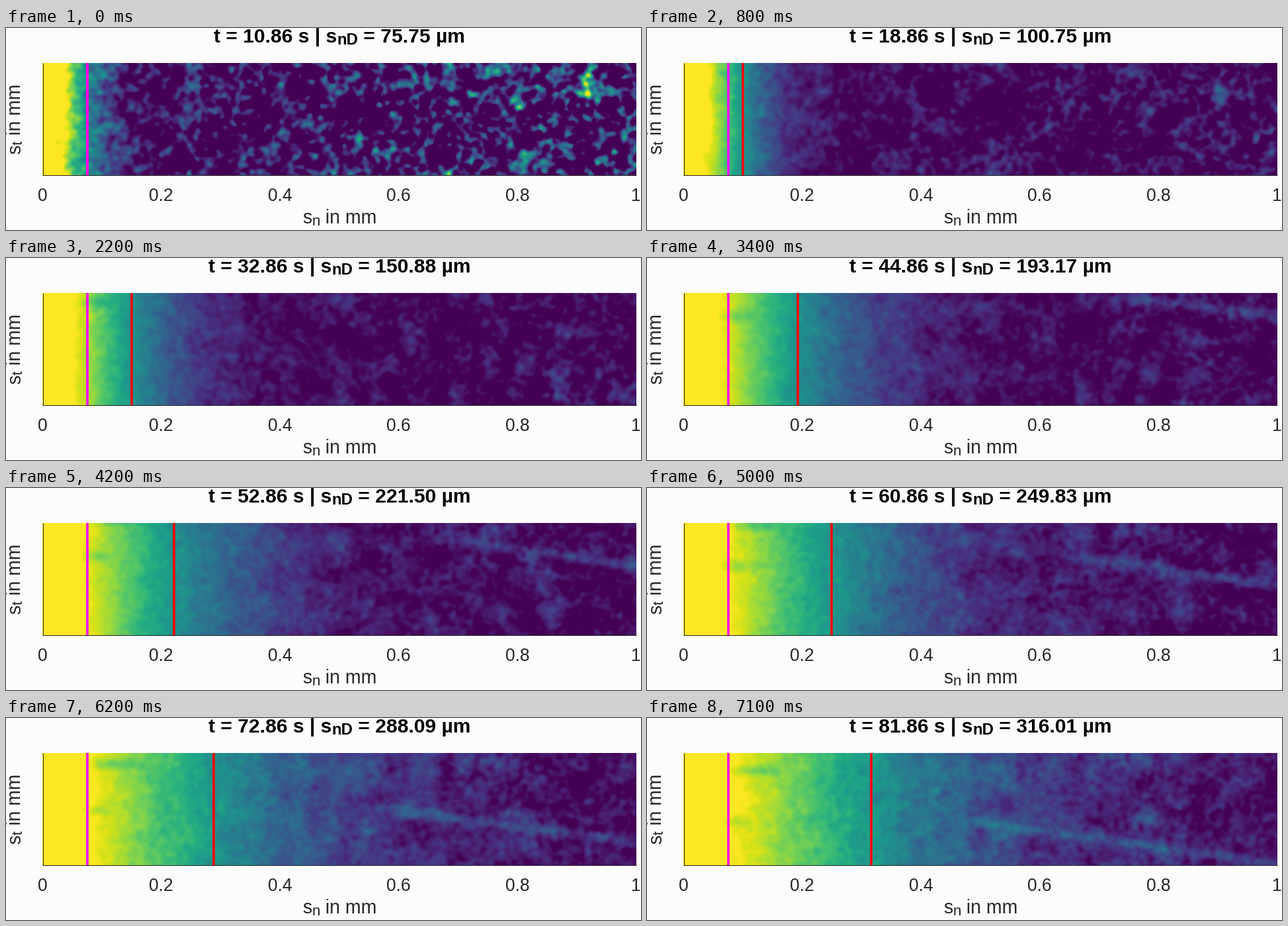
Recreate the animation shown at these times as a matplotlib script. Size 960 by 306 pixels, loop 7.2 s.

```python
import math

import numpy as np
import matplotlib.pyplot as plt
from matplotlib.animation import FuncAnimation

W, H, DPI = 960, 306, 100
FRAMES, INTERVAL = 72, 100
LEFT, RIGHT, TOP, BOTTOM = 55, 952.5, 53, 223
NX, NY, CELL = 450, 85, 2

plt.rcParams["font.family"] = "Liberation Sans"
rng = np.random.default_rng(12)

# Measured diffusion depth in micrometres at a few frames
DEPTH_AT = [0, 8, 22, 34, 50, 62, 71]
DEPTH = [75.75, 100.75, 150.88, 193.17, 249.83, 288.09, 316.01]

# Pixel coordinates of the field samples, and distance in mm
X, Y = np.meshgrid(LEFT + CELL * (np.arange(NX) + .5),
                   TOP + CELL * (np.arange(NY) + .5))
MM = (X - LEFT) / (RIGHT - LEFT)
FX = np.fft.fftfreq(NX)[None, :]
FY = np.fft.fftfreq(NY)[:, None]

Z = np.linspace(0, 4, 400)
ERFC = np.array([math.erfc(z) for z in Z])


def to_px(mm):
    return LEFT + mm * (RIGHT - LEFT)


def spectrum(sigma):
    """Spectrum of smooth noise with unit variance."""
    f = np.fft.fft2(rng.standard_normal((NY, NX)))
    f *= np.exp(-2 * (np.pi * sigma) ** 2 * (FX ** 2 + FY ** 2))
    f[0, 0] = 0
    return f / np.fft.ifft2(f).real.std()


STEP = 14
KEYS = FRAMES // STEP + 2
fine = [spectrum(1.6) for _ in range(KEYS)]
coarse = [spectrum(5) for _ in range(KEYS)]


def noise(keys, i):
    """Noise that drifts left and down while it slowly changes."""
    k, part = divmod(i, STEP)
    a = part / STEP * np.pi / 2
    f = np.cos(a) * keys[k] + np.sin(a) * keys[k + 1]
    phase = np.exp(-2j * np.pi * (FX * -.9 * i + FY * .44 * i))
    return np.fft.ifft2(f * phase).real


def blob(x, y, sx, sy, amp):
    return amp * np.exp(-((X - x) / sx) ** 2 / 2 - ((Y - y) / sy) ** 2 / 2)


def front(x, depth, source):
    """Diffusion profile that falls to one half at the given depth."""
    k = np.interp(.5 / source, ERFC[::-1], Z[::-1])
    return source * np.interp(k * x / depth, Z, ERFC)


def streak(i):
    """Faint slanted trail that sinks and grows towards the left."""
    line = 220 - 3.55 * (FRAMES - 1 - i) + .137 * (X - 950)
    fade = 1 / (1 + np.exp((950 - 6.4 * i - X) / 20))
    return .15 * fade * np.exp(-((Y - line) / 6) ** 2 / 2)


def fingers(i):
    """Two darker notches that sink along the edge of the front."""
    left = FRAMES - 1 - i
    return (blob(158, 80 - 1.1 * left, 24, 6, -.13)
            + blob(135, 157 - 1.85 * left, 16, 6, -.11))


def clouds(i):
    """Bright patches, strong at first, and one drifting particle."""
    fade = .3 + .7 * np.exp(-i / 4)
    patches = (blob(518, 82, 28, 13, .2) + blob(740, 64, 24, 10, .4)
               + blob(520, 125, 38, 13, -.2))
    return fade * (patches + blob(894 - 1.8 * i, 91 + .9 * i, 18, 8, .45))


def field(i, depth):
    small, large = noise(fine, i), noise(coarse, i)
    amp = max(.25 / np.sqrt(1 + i), .045)
    source = 1.18 + .34 * np.exp(-i / 25)
    v = front(np.abs(MM + .006 * large), depth, source)
    v += amp * np.sqrt(MM) * (.95 * small + .35 * large) + .02 * large
    return v + clouds(i) + streak(i) + fingers(i) + .03 * i / FRAMES


fig = plt.figure(figsize=(W / DPI, H / DPI), dpi=DPI, facecolor="#fcfcfd")
ax = fig.add_axes([0, 0, 1, 1])
ax.axis("off")
image = ax.imshow(np.zeros((NY, NX)), cmap="viridis", vmin=0, vmax=1,
                  extent=(LEFT, RIGHT, BOTTOM, TOP), aspect="auto",
                  interpolation="bilinear")
ax.set_xlim(0, W)
ax.set_ylim(H, 0)


def rule(xs, ys, color, width, z):
    return ax.plot(xs, ys, color=color, lw=width * 72 / DPI, zorder=z,
                   solid_capstyle="butt")[0]


def label(size, text="", **kw):
    return ax.text(0, 0, text, fontsize=size * 72 / DPI, va="baseline", **kw)


def place(runs, center, base, upright=False):
    """Set runs side by side, the second one lowered as a subscript."""
    boxes = [r.get_window_extent(fig.canvas.get_renderer()) for r in runs]
    sizes = [b.height if upright else b.width for b in boxes]
    pos = -sum(sizes) / 2
    for k, (run, size) in enumerate(zip(runs, sizes)):
        low = base + (3 if k == 1 else 0)
        run.set_position((low, center - pos) if upright
                         else (center + pos, low))
        pos += size


def axis_label(sub, center, base, upright=False):
    kw = dict(color="#262626", rotation=90 if upright else 0,
              rotation_mode="anchor")
    runs = [label(28.5, "s", **kw), label(22.5, sub, **kw),
            label(28.5, " in mm", **kw)]
    place(runs, center, base, upright)


rule([LEFT + .5] * 2, [TOP, BOTTOM], "#262626", 1, 3)
rule([LEFT, RIGHT], [BOTTOM - .5] * 2, "#262626", 1, 3)
red = rule([0, 0], [TOP, BOTTOM], "#ff0000", 3.6, 4)
rule([to_px(DEPTH[0] / 1000)] * 2, [TOP, BOTTOM], "#ff00ff", 3.6, 5)

for k in range(6):
    tick = label(26.5, f"{k / 5:g}", color="#262626", ha="center")
    tick.set_position((to_px(k / 5), 262))
axis_label("n", 504, 296)
axis_label("t", 138, 22, upright=True)
title = [label(size, color="black", weight="bold") for size in (30, 24, 30)]


def update(i):
    depth = np.interp(i, DEPTH_AT, DEPTH)
    image.set_data(field(i, depth / 1000))
    red.set_xdata([to_px(depth / 1000)] * 2)
    parts = f"t = {10.86 + i:.2f} s | s", "nD", f" = {depth:.2f} µm"
    for run, part in zip(title, parts):
        run.set_text(part)
    place(title, 504, 22)
    return [image, red, *title]


anim = FuncAnimation(fig, update, frames=FRAMES, interval=INTERVAL,
                     repeat=True, repeat_delay=0)
plt.show()
```
